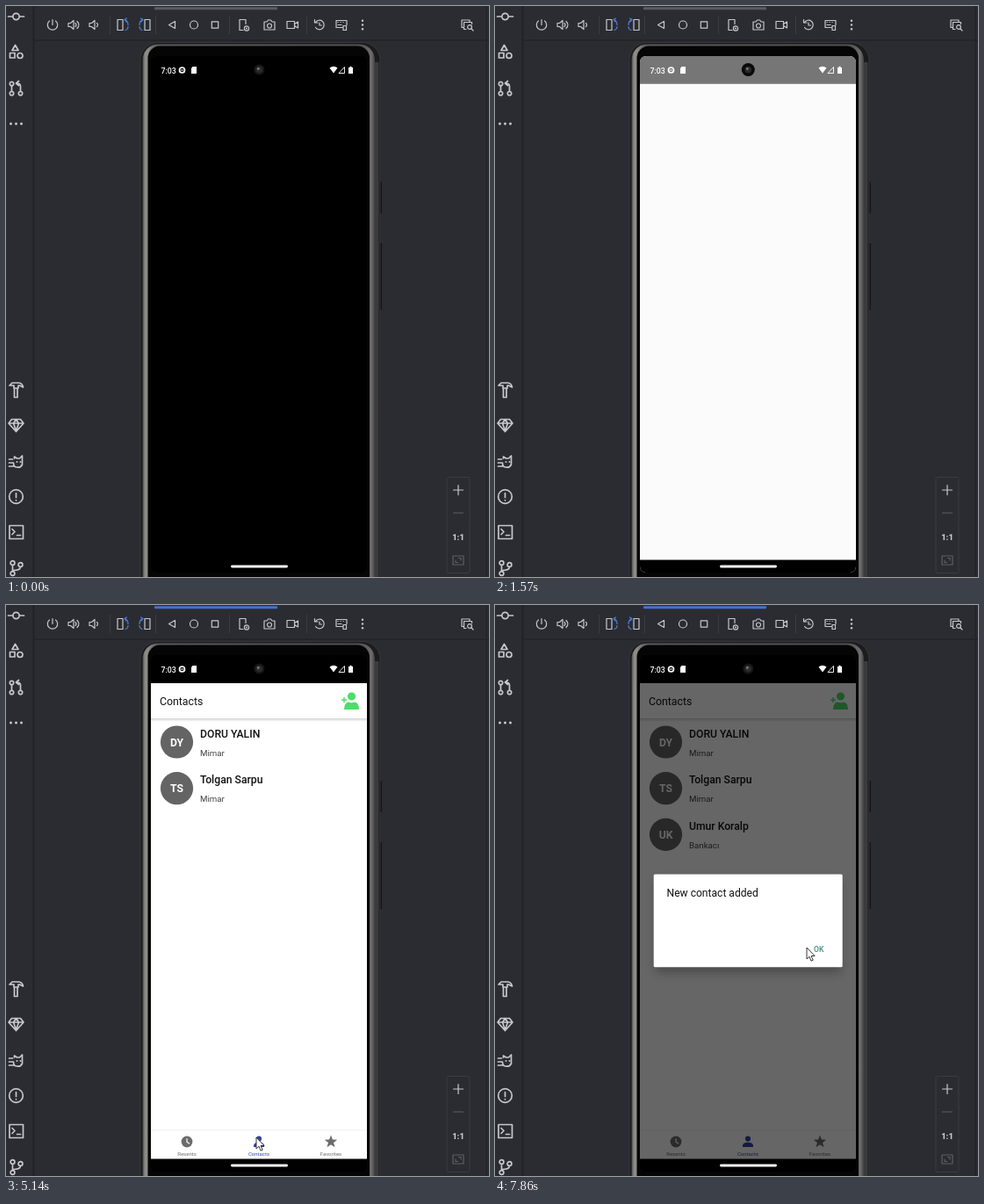
An HTML page that plays this animation: 550x650 px, repeating every 8 s.

```html
<!DOCTYPE html>
<html lang="en">
<head>
<meta charset="utf-8">
<title>Contacts app in an emulator</title>
<style>
  html, body { margin: 0; width: 100%; height: 100%; overflow: hidden; background: #2b2c31; }
  svg { display: block; width: 550px; height: 650px; }
  text { font-family: Roboto, "Noto Sans", sans-serif; white-space: pre; }
  .line { fill: none; stroke: #c6c8cd; stroke-width: 1.2; stroke-linecap: round; stroke-linejoin: round; }
  .bold { stroke-width: 1.7; }
  .dim { stroke: #5d5f65; }
  .blue { stroke: #4a7fe0; }
</style>
</head>
<body>
<svg viewBox="0 0 550 650" xmlns="http://www.w3.org/2000/svg">
  <defs>
    <linearGradient id="metal" gradientUnits="userSpaceOnUse" x1="155" x2="421" y1="0" y2="0">
      <stop offset="0" stop-color="#3c3c3d"/><stop offset=".012" stop-color="#8d8b88"/>
      <stop offset=".024" stop-color="#8d8b88"/><stop offset=".06" stop-color="#5a5a5b"/>
      <stop offset=".94" stop-color="#505051"/><stop offset=".982" stop-color="#6e6d6c"/>
      <stop offset="1" stop-color="#333334"/>
    </linearGradient>
    <linearGradient id="shade" x2="0" y2="1">
      <stop offset="0" stop-color="#000" stop-opacity=".17"/><stop offset="1" stop-color="#000" stop-opacity="0"/>
    </linearGradient>
    <filter id="soft" x="-20%" y="-20%" width="140%" height="150%"><feGaussianBlur stdDeviation="6"/></filter>
    <clipPath id="screenClip"><rect x="165" y="57" width="246" height="588" rx="7"/></clipPath>
    <clipPath id="avatarClip"><circle r="18.5"/></clipPath>
  </defs>
  <g id="ide"></g>
  <g id="phone"></g>
  <g id="screen" clip-path="url(#screenClip)"></g>
  <g id="overlay"></g>
</svg>
<script>
const LOOP = 8000, STEP = 1000 / 7;
const $ = id => document.getElementById(id);
const rect = (x, y, w, h, fill, more = '') => `<rect x="${x}" y="${y}" width="${w}" height="${h}" fill="${fill}" ${more}/>`;
const circle = (x, y, r, fill, more = '') => `<circle cx="${x}" cy="${y}" r="${r}" fill="${fill}" ${more}/>`;
const text = (x, y, size, str, fill = '#111', weight = 400, anchor = 'start') =>
  `<text x="${x}" y="${y}" font-size="${size}" fill="${fill}" font-weight="${weight}" text-anchor="${anchor}">${str}</text>`;
const shape = (d, fill, more = '') => `<path d="${d}" fill="${fill}" ${more}/>`;
const line = (d, cls = '') => `<path class="line ${cls}" d="${d}"/>`;
const at = (x, y, body, scale = 1) => `<g transform="translate(${x} ${y}) scale(${scale})">${body}</g>`;
// Path of a circle, so that outlines can be joined into one path
const ring = (x, y, r) => `M${x - r} ${y}a${r} ${r} 0 1 0 ${2 * r} 0a${r} ${r} 0 1 0 ${-2 * r} 0`;
const box = (x, y, w, h) => `M${x} ${y}h${w}v${h}h${-w}z`;

const ICON = '#c6c8cd';
const SPEAKER = 'M-6-2h2.5l3.5-3v10l-3.5-3h-2.5z';
const ROTATE = line(box(-6, -6, 6, 12)) + line('M2-6q4 1 4 6M2-6l2.5-1.5M2-6l2 2.5M6 2q0 3-3 4', 'blue');

const sideIcons = [
  [12, line(ring(0, 0, 3.6) + 'M-9 0h5M4 0h5', 'bold')],
  [52.5, line('M-1-8l3.500 6h-7z' + box(-7, 1, 5.5, 5.5) + ring(4.5, 4, 3), 'bold')],
  [93.5, line(ring(-5, -5, 2.2) + ring(-5, 6, 2.2) + ring(5, 6, 2.2) + 'M-5-2.5v6M5 3.5v-6q0-3-5-3M3-8l-3 2.5 3 2.5', 'bold')],
  [134, [-6, 0, 6].map(x => circle(x, 0, 1.5, ICON)).join('')],
  [437, line('M-7.500-5l3-3h8q4 1 4.500 5l-4-2h-1.500v3h-5v-3h-5zM-2-2v10.500h3.500v-10.500', 'bold')],
  [477, line('M-5-6.500h10l3.500 4.500-8.500 9.500-8.500-9.500zM-8-2h16M-3-2l3 8.500 3-8.500-3-4.500z', 'bold')],
  [519, line('M-2-4v-2l3 2h3l3-3v10q-2 4-6 3-4 0-4-5M-8-3h4M-8 1h5M-8 5h6', 'bold') + circle(1, 0, 1, ICON) + circle(5, 0, 1, ICON)],
  [558.5, line(ring(0, 0, 7.8) + 'M0-4v5M0 4v.3', 'bold')],
  [599, line(box(-7.5, -7.5, 15.5, 15) + 'M-4.5-3.5l3 3-3 3M1 3.5h4', 'bold')],
  [639, line(ring(-4, -5, 2.4) + ring(5, -3, 2.4) + ring(-4, 7, 2.4) + 'M-4-2.5v7M5-.5q0 4-9 4', 'bold')],
];
const toolIcons = [
  [53, line('M0-6v6M-3.5-4.5a5.7 5.7 0 1 0 7 0')],
  [77, line(SPEAKER + 'M2-2q2 2 0 4M4-4q4 4 0 8')],
  [101, line(SPEAKER + 'M2.5-2q2 2 0 4')],
  [133, ROTATE],
  [158, `<g transform="scale(-1 1)">${ROTATE}</g>`],
  [189, line('M-3.5 0l7-4v8z')],
  [214, line(ring(0, 0, 4.5))],
  [238, line(box(-3.7, -3.7, 7.4, 7.4))],
  [271, line('M-1 6h-4v-12h7v5' + ring(3, 4, 2.6)) + circle(3, 4, 1, ICON)],
  [300, line('M-6-3.5h3l1.5-2h3l1.5 2h3v9h-12z' + ring(0, 1, 2.5))],
  [326, line(box(-6, -4, 8.5, 8) + 'M2.5-1l4-2.5v7l-4-2.5')],
  [357, line('M-4.5-3a5.3 5.3 0 1 1 0 6M-5.5-6v3.5h3.5M0-2.5v3h2.5')],
  [382, line('M1 3h-7v-8h12v5M-4-3h.2M-1-3h.2M2-3h.2M-4 0h4' + box(2, 1, 3.5, 5))],
  [406, [-4.8, 0, 4.8].map(y => circle(0, y, 1.2, ICON)).join('')],
  [525, line('M-4 3h-2v-8.500h9v2M-1 5h-2.500v-8h9v2' + ring(3, 2.5, 2.4) + 'M5 4.500l2 2')],
];

function drawIde() {
  return rect(0, 0, 550, 650, '#2b2c31') +
    rect(30.5, 0, 2, 650, '#212226') + rect(32, 38.5, 518, 1.2, '#202125') + rect(546.5, 0, 1.5, 650, '#232428') +
    sideIcons.map(([y, icon]) => at(11.5, y, icon)).join('') +
    toolIcons.map(([x, icon]) => at(x, 21.5, icon)).join('') +
    [118, 170, 254, 342].map(x => rect(x, 11, 1, 21, '#3b3c41')).join('') +
    rect(502, 536.5, 26, 109, '#2b2c31', 'stroke="#3b3c41" rx="2"') +
    line('M509.500 551h11M515 545.500v11') + line('M509.500 577h11', 'dim') +
    text(515, 607.7, 9.4, '1:1', ICON, 900, 'middle') +
    at(515, 631, line(box(-6, -5, 12, 10) + 'M-3 0v2.500h2.500M3 0v-2.500h-2.500', 'dim'));
}

function drawPhone() {
  return rect(425, 200, 3, 36, '#141416') + rect(425, 270, 3, 76, '#141416') +
    rect(153, 41.5, 273, 660, '#1c1c1e', 'rx="20" stroke="#38383a"') +
    rect(420, 64, 4.5, 600, '#3b3b3d') +
    rect(155.5, 43.5, 264.5, 660, 'url(#metal)', 'rx="18"') +
    rect(161.5, 45.5, 252.5, 660, '#050506', 'rx="14"');
}

function statusBar() {
  const white = '#fff';
  return text(176.5, 76.5, 8.8, '7:03', white, 500) +
    circle(200.5, 73, 3, 'none', `stroke="${white}" stroke-width="1.700"`) + rect(199, 72.5, 3, 1, white) +
    shape('M212.500 69h4.500v8h-6v-6z', white) +
    shape('M368.500 70.500q4.500-3.500 9 0l-4.500 6z', white) +
    shape('M379 76.500l6.500-7v7z', 'none', `stroke="${white}" stroke-width=".9"`) +
    shape('M390 70h1.500v-1.200h2v1.200h1.500v7h-5z', white);
}

const handle = () => rect(256, 636.5, 65, 3, '#f4f4f4', 'rx="1.400"');
const navBar = () => rect(165, 630.5, 247, 15, '#000') + handle();

function camera(bright) {
  return (bright ? circle(288.3, 72.5, 7.5, '#0a0a0a') : circle(288.3, 72.5, 6, '#161616')) +
    circle(288.3, 72.5, 3.8, '#2b2b2b') + circle(287.3, 71.5, 1.4, '#77777b');
}

function addressBook() {
  const ink = 'stroke="#111" stroke-width="2.400" stroke-linejoin="round" stroke-linecap="round"';
  const colors = ['#e58a70', '#7fa39b', '#ef6f8c', '#d9a58a'];
  return colors.map((color, i) => rect(318, 315 + i * 18.3, 15.5, 18.3, color, `rx="3" ${ink}`)).join('') +
    rect(251.5, 302, 73, 99.5, '#eff1f1', `rx="8" ${ink}`) +
    shape('M268.500 302h-9q-8 0-8 8v83.500q0 8 8 8h9z', '#8c9799', ink) +
    [318, 340, 362, 384].map(y => rect(243, y - 4, 17, 8, '#b9dde2', `rx="4" ${ink}`)).join('') +
    circle(295.5, 331, 9.5, 'none', ink) +
    shape('M279.500 359q0-18 10-19.500M311.500 359q0-18-10-19.500M279.500 371.500h32M285 381h21', 'none', ink);
}

const HEAD_AND_BODY = ring(0, -3.4, 3.1) + 'M-6 6v-1.500q0-3.800 6-3.800t6 3.800v1.500z';
const STAR = Array.from({ length: 10 }, (_, i) => {
  const r = i % 2 ? 3.2 : 7.6, a = i * Math.PI / 5;
  return (i ? 'L' : 'M') + (r * Math.sin(a)).toFixed(2) + ' ' + (-r * Math.cos(a)).toFixed(2);
}).join('') + 'z';
const tabs = [
  ['Resents', 206, c => circle(0, 0, 6.4, c) + shape('M0-3.800v4l3 2', 'none', 'stroke="#fff" stroke-width="1.200"')],
  ['Contacts', 288, c => shape(HEAD_AND_BODY, c)],
  ['Favorites', 370, c => shape(STAR, c)],
];

function tabBar(active, pressed) {
  return rect(165, 598, 247, 33, '#fff') + rect(165, 597.5, 247, .8, '#ececec') +
    (pressed ? rect(tabs[active][1] - 41, 599, 84, 31, '#eee', 'rx="4"') : '') +
    tabs.map(([label, x, icon], i) => {
      const color = i === active ? '#3344a6' : '#6b6b6b';
      return at(x, 611, icon(color)) + text(x, 627.3, 6, label, color, 400, 'middle');
    }).join('');
}

function header(title, x, bottom, baseline) {
  return rect(165, bottom, 247, 4, 'url(#shade)') + rect(165, 89, 247, bottom - 89, '#fff') + text(x, baseline, 12.3, title);
}

function row(i, x, initials, name, detail) {
  const y = 156 + i * 52.7, textX = x < 192 ? x + 23.5 : x + 26.5;
  const label = initials
    ? text(0, 4.5, 12.2, initials, '#fff', 700, 'middle')
    : ['undefi', 'nedun', 'defin'].map((part, k) => text(0, -5 + k * 14.5, 12.2, part, '#fff', 700, 'middle')).join('');
  return at(x, y, circle(0, 0, 18.6, '#646464') + `<g clip-path="url(#avatarClip)">${label}</g>`) +
    text(textX, y - 5.5, 12.2, name, '#111', 500) + text(textX, y + 15.5, 9.7, detail, '#444');
}

const HANDSET = 'M20 15.500c-1.250 0-2.450-.2-3.570-.57-.35-.11-.74-.03-1.020.24l-2.200 2.200c-2.830-1.440-5.150-3.750-6.590-6.590l2.200-2.210c.28-.26.36-.65.25-1C8.700 6.450 8.500 5.250 8.500 4c0-.55-.45-1-1-1H4c-.55 0-1 .45-1 1 0 9.390 7.610 17 17 17 .55 0 1-.45 1-1v-3.500c0-.55-.45-1-1-1z';
const callIcon = y => at(379.5, y - 10, shape(HANDSET, '#4fdc6c') + shape('M20.500 4l-6 6M14 5v5.500h5.500', 'none', 'stroke="#4fdc6c" stroke-width="2"'), .8);

// Text baselines: replaced initials use the same metrics as any other contact
function recents(hasRows, pressed) {
  const date = 'Sun Feb 02 2025';
  return rect(165, 89, 247, 542, '#fff') + header('Resents', 175, 129, 114.3) +
    (hasRows ? row(0, 191, 'DY', 'DORU YALIN', date) + row(1, 191, '', 'undefined undefined', date) + callIcon(156) + callIcon(208.7) : '') +
    tabBar(0, pressed);
}

function contacts(hasNew, pressed) {
  return rect(165, 89, 247, 542, '#fff') + header('Contacts', 175, 129, 114.3) +
    at(393.5, 109.5, shape(ring(0, -5.5, 4.6) + 'M-8.500 9.500q0-8 5-8.500 3.500 1.500 7 0 5 .5 5 8.500z', '#4ade69')) +
    shape('M385 105v6M382 108h6', 'none', 'stroke="#4ade69" stroke-width="1.400"') +
    row(0, 194.5, 'DY', 'DORU YALIN', 'Mimar') + row(1, 194.5, 'TS', 'Tolgan Sarpu', 'Mimar') +
    (hasNew ? row(2, 194.5, 'UK', 'Umur Koralp', 'Bankacı') : '') + tabBar(1, pressed);
}

const fields = [['Name', 'Umur'], ['Surname', 'Koralp'], ['Phone', '0000000000000'],
  ['Email', 'umur@x.example'], ['Address', 'izmir'], ['Job', 'Bankacı']];
const fieldChars = fields.reduce((sum, [, value]) => sum + value.length, 0);

function form(progress, pressed) {
  let left = Math.round(fieldChars * progress);
  const inputs = fields.map(([label, value], i) => {
    const y = 45.3 * i, typed = value.slice(0, Math.max(0, left));
    left -= value.length;
    return text(171, 145.7 + y, 7.2, label, '#8f9bb3', 700) +
      rect(171.5, 151.5 + y, 233, 25, '#f7f9fc', 'rx="2" stroke="#e9ecf3" stroke-width=".8"') +
      text(183.5, 167.5 + y, 9.2, typed, '#333b4e');
  }).join('');
  return rect(165, 89, 247, 542, '#f1f1f1') + header('Add New Contact', 208, 124.5, 111.5) +
    shape('M187 107h-9M182 102.500l-4.500 4.500 4.500 4.500', 'none', 'stroke="#111" stroke-width="1.300"') +
    inputs + rect(171, 429, 234.5, 29, pressed ? '#1f36b5' : '#2a45d5', 'rx="2"') +
    text(288, 446.6, 8.6, 'SAVE', '#fff', 700, 'middle');
}

function dialog() {
  return rect(165, 57, 247, 574, '#000', 'opacity=".6"') +
    rect(183, 314, 211, 104, '#000', 'opacity=".28" filter="url(#soft)"') +
    rect(180.7, 306.5, 215, 105.7, '#fff', 'rx="1.500"') +
    text(195.5, 332, 12.1, 'New contact added') + text(363, 395.3, 8.6, 'OK', '#3d8f7d', 500);
}

const splashShift = s => s === 1 ? 95 : s === 2 ? 19 : 0;

function screenAt(s) {
  if (s < 1) return rect(165, 57, 247, 589, '#000') + statusBar() + camera(false) + handle();
  if (s < 8) {
    return rect(165, 57, 247, 589, '#d3d8dc') +
      at(splashShift(s), 0, rect(165, 57, 247, 589, '#fbfbfb') + addressBook()) + statusBar() + camera(true);
  }
  if (s < 18) return rect(165, 57, 247, 589, '#fbfbfb') + rect(165, 57, 247, 31.7, '#767676') + statusBar() + camera(true) + navBar();
  let page;
  if (s < 34) page = recents(s >= 20, s === 29 || s === 30);
  else if (s < 46) page = contacts(false, s < 36);
  else if (s < 54) page = form(Math.min(1, (s - 46) / 5), s === 53);
  else page = contacts(true, false) + dialog();
  return rect(165, 57, 247, 589, '#000') + page + statusBar() + camera(false) + navBar();
}

// Pointer stops: step, x, y
const stops = [[27, 262, 560], [29, 201, 603], [30, 201, 603], [33, 285, 606], [36, 285, 606], [41, 358, 163],
  [42, 375, 138], [43, 391, 114], [46, 391, 114], [47, 290, 164], [51, 290, 392], [52, 273, 432],
  [53, 273, 432], [54, 314, 411], [55, 355, 390]];

function pointerAt(s) {
  if (s < stops[0][0]) return '';
  const next = Math.max(1, stops.findIndex(([step]) => step >= s));
  const [s0, x0, y0] = stops[next - 1], [s1, x1, y1] = stops[next];
  const k = (s - s0) / (s1 - s0);
  return at(x0 + (x1 - x0) * k, y0 + (y1 - y0) * k,
    shape('M0 0v13l3-2.800 2 5 2.200-1-2.100-4.700h4z', '#fff', 'stroke="#222" stroke-width=".9"'));
}

function render(s) {
  $('screen').innerHTML = screenAt(s);
  $('overlay').innerHTML = rect(169, 1.3, 140, 3, s < 26 ? '#5b5d61' : '#3d73d8', 'rx="1"') + pointerAt(s);
}

$('ide').innerHTML = drawIde();
$('phone').innerHTML = drawPhone();
const start = performance.now();
let shown = -1;
function tick() {
  const time = (performance.now() - start) % LOOP;
  const step = Math.min(55, Math.floor((time + 5) / STEP));
  if (step !== shown) render(shown = step);
  requestAnimationFrame(tick);
}
tick();
</script>
</body>
</html>
```
